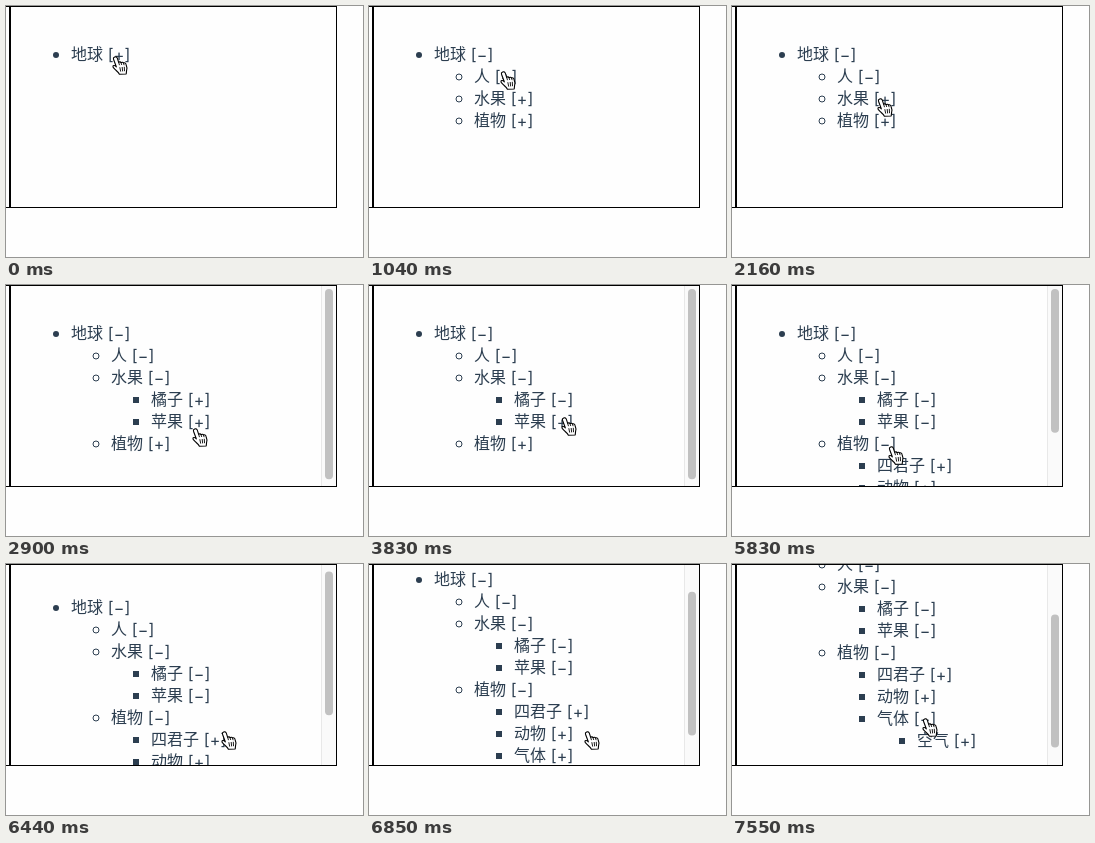
Write an HTML page that moves like this. It is 357 px wide and 251 px high and loops after 8 s.

```html
<!DOCTYPE html>
<html lang="zh">
<head>
<meta charset="utf-8">
<style>
html, body { margin: 0; width: 100%; height: 100%; overflow: hidden; background: #fefefe; }
svg { display: block; }
text { fill: #2c3e50; font: 16px "Noto Sans CJK SC", "Noto Sans CJK", "Noto Sans CJK JP", sans-serif; }
.mark { font-family: Inter, sans-serif; text-anchor: middle; }
.bullet { fill: #2c3e50; stroke: #2c3e50; stroke-width: 0; }
.ring { fill: none; stroke-width: 1; }
</style>
</head>
<body>
<svg width="357" height="251" viewBox="0 0 357 251">
  <defs><clipPath id="view"><rect x="5" y="1" width="325" height="200"/></clipPath></defs>
  <g clip-path="url(#view)">
    <g id="tree"></g>
    <g id="bar">
      <rect x="315" y="1" width="15" height="200" fill="#fafafa"/>
      <rect x="315" y="1" width="1" height="200" fill="#e8e8e8"/>
      <rect id="thumb" x="319" width="8" rx="4" fill="#c1c1c1"/>
    </g>
  </g>
  <path d="M0 0H331V1H0ZM0 201H331V202H0ZM3 0H5V202H3ZM330 0H331V202H330Z"/>
  <g id="hand" stroke="#000" stroke-linejoin="round" stroke-linecap="round">
    <path fill="#fff" stroke-width="1.1" d="M2.2 1.2C3.4 .3 4.9 .9 5.3 2.2L6.6 6.2C7.4 5.6 8.6 5.8 9 6.6C9.9 6 11 6.2 11.5 7C12.6 6.5 13.7 7 14 8.2C14.8 10.2 15.4 12 14.6 14.4L14.2 18L7.4 18.2C6.6 16.2 4.6 15 3 13.4C1.8 12.4 .6 11.2 .9 10.2C1.4 9 2.8 9.4 4.3 10.8L1.5 3.2C1.2 2.3 1.5 1.6 2.2 1.2Z"/>
    <path fill="none" stroke-width=".9" d="M7.9 11.6L8.6 15.2M10.2 11.4L10.6 15M12.3 11.2L12.5 14.8M6.6 6.2L7.4 8.8M9 6.6L9.6 8.6M11.5 7L12 8.8"/>
  </g>
</svg>
<script>
const LOOP = 8000, ROW = 22, VIEW = 200, TRACK = 194;
const $ = id => document.getElementById(id);
const node = (name, toggles = [], kids = []) => ({ name, toggles, kids });

// toggles: times at which a node opens or closes
const root = node('地球', [110], [
  node('人', [1730]),
  node('水果', [2370], [node('橘子', [3510]), node('苹果', [4120])]),
  node('植物', [4700, 4760, 5830], [
    node('四君子'),
    node('动物'),
    node('气体', [7550], [node('空气')])
  ])
]);

// start, end, x, y of each pointer move
const home = [106, 50];
const moves = [
  [630, 760, 126, 64],
  [890, 1040, 131, 65],
  [1705, 1900, 142, 92],
  [2085, 2160, 145, 92],
  [2400, 2890, 186, 143],
  [2940, 3150, 191, 117],
  [3160, 3240, 191, 115],
  [3690, 3830, 192, 132],
  [4130, 4500, 148, 161],
  [4920, 5050, 191, 162],
  [5240, 5450, 156, 161],
  [5980, 6290, 215, 167],
  [7045, 7340, 190, 154]
];
const scrolls = [[6440, 5], [6500, 16], [6850, 33], [6880, 70]];

function add(parent, tag, attrs, text) {
  const el = document.createElementNS('http://www.w3.org/2000/svg', tag);
  for (const k in attrs) el.setAttribute(k, attrs[k]);
  if (text) el.textContent = text;
  parent.appendChild(el);
  return el;
}

function build(item, depth) {
  const x = 65 + depth * 40, g = add($('tree'), 'g', {});
  const mid = x + item.name.length * 16 + 16;
  if (depth > 1) add(g, 'rect', { class: 'bullet', x: x - 18, y: -2, width: 6, height: 6 });
  else add(g, 'circle', { class: depth ? 'bullet ring' : 'bullet', cx: x - 15, cy: 1, r: 3 });
  add(g, 'text', { x, y: 6 }, item.name);
  add(g, 'text', { class: 'mark', x: mid - 8.3, y: 6 }, '[');
  item.sign = add(g, 'text', { class: 'mark', x: mid, y: 7 }, '+');
  add(g, 'text', { class: 'mark', x: mid + 8.3, y: 6 }, ']');
  item.el = g;
  item.kids.forEach(k => build(k, depth + 1));
}

function place(item, t, shown, row) {
  const open = item.toggles.filter(s => t >= s).length % 2 === 1;
  item.el.style.display = shown ? '' : 'none';
  item.sign.textContent = open ? '−' : '+';
  if (shown) item.el.setAttribute('transform', `translate(0 ${48 + row++ * ROW})`);
  for (const k of item.kids) row = place(k, t, shown && open, row);
  return row;
}

function pointer(t) {
  let [x, y] = home;
  for (const [from, to, nx, ny] of moves) {
    if (t < from) break;
    const p = Math.min(1, (t - from) / (to - from));
    const e = p * p * (3 - 2 * p);
    x += (nx - x) * e;
    y += (ny - y) * e;
  }
  return [Math.round(x), Math.round(y)];
}

function draw(t) {
  const rows = place(root, t, true, 0);
  const height = 72 + rows * ROW;
  const top = scrolls.reduce((v, [at, to]) => t >= at ? to : v, 0);
  $('tree').setAttribute('transform', `translate(0 ${-top})`);
  $('bar').style.display = height > VIEW ? '' : 'none';
  $('thumb').setAttribute('y', 4 + top / height * TRACK);
  $('thumb').setAttribute('height', Math.min(1, VIEW / height) * TRACK);
  $('hand').setAttribute('transform', `translate(${pointer(t).join(' ')})`);
}

build(root, 0);
draw(0);
const start = performance.now();
function tick() {
  draw((performance.now() - start) % LOOP);
  requestAnimationFrame(tick);
}
requestAnimationFrame(tick);
</script>
</body>
</html>
```
